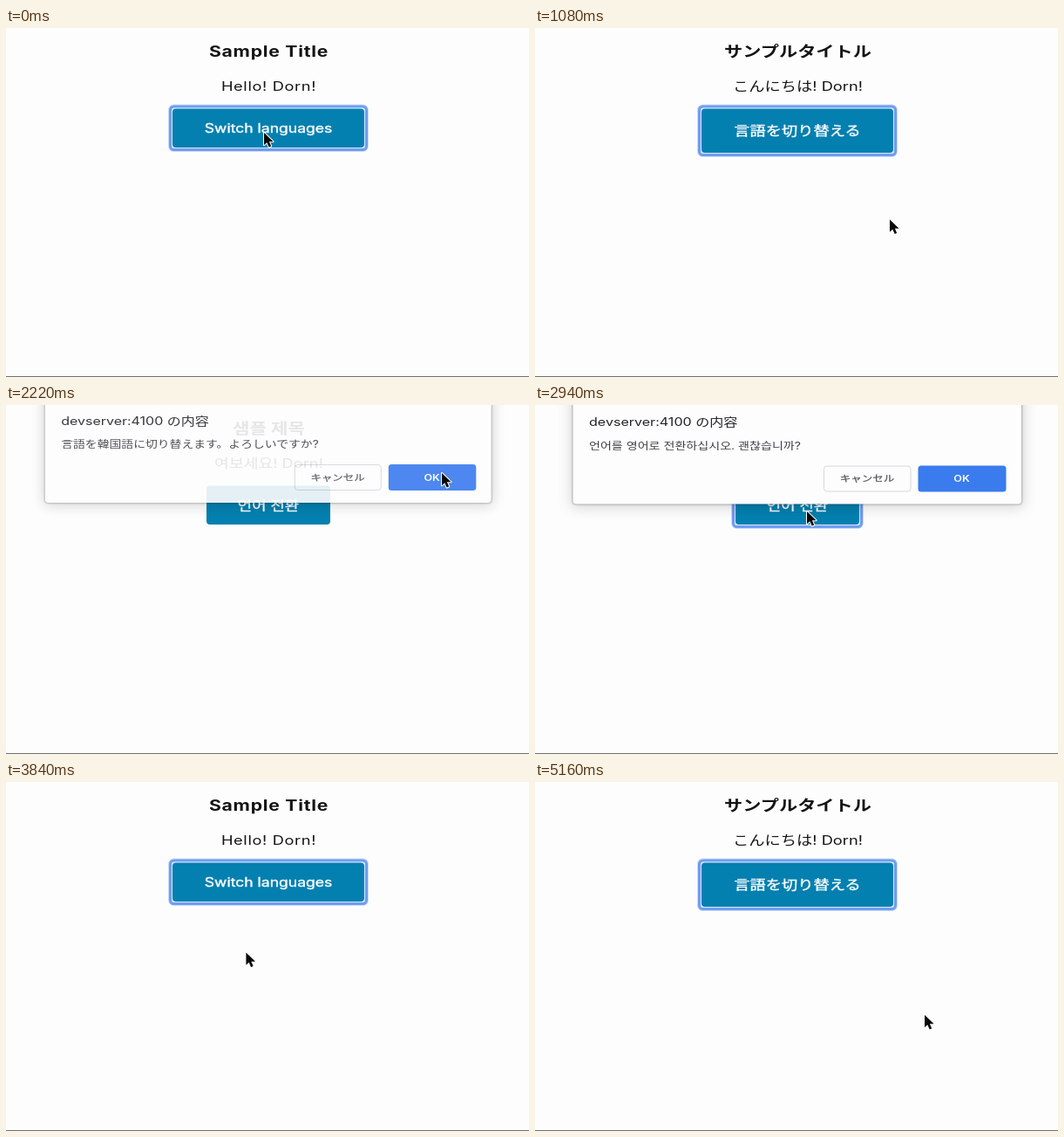
An HTML page that plays this animation: 600 by 400 pixels, repeating every 5.28 s.

```html
<!DOCTYPE html>
<html lang="en">
<head>
<meta charset="utf-8">
<title>Language switch</title>
<style>
  html, body { margin: 0; width: 100%; height: 100%; overflow: hidden; background: #fdfdfd; }
  svg { display: block; width: 600px; height: 400px; }
  text { font-family: Inter, "Noto Sans CJK JP", "Noto Sans CJK KR", "Noto Sans CJK", sans-serif; white-space: pre; }
  text:lang(ko) { font-family: Inter, "Noto Sans CJK KR", "Noto Sans CJK", sans-serif; }
  .halo { filter: blur(8px); }
  .edge { filter: blur(1.2px); }
</style>
</head>
<body>
<svg id="stage" viewBox="0 0 600 400"></svg>
<script>
const NS = 'http://www.w3.org/2000/svg';
const LOOP = 5280, STEP = 60, FADE = 180;
const PAPER = '#fdfdfd', INK = '#141414', TEAL = '#0480b0', BLUE = '#3a7bee';
const CENTER = 301, BUTTON_TOP = 92.5;
const WIDEN = 'scale(1.14 .91)';

function add(parent, tag, attrs = {}) {
  const el = document.createElementNS(NS, tag);
  for (const key in attrs) el.setAttribute(key, attrs[key]);
  parent.appendChild(el);
  return el;
}

function box(parent, x, y, width, height, attrs) {
  return add(parent, 'rect', { x, y, width, height, ...attrs });
}

function label(parent, str, x, y, size, attrs = {}) {
  const el = add(parent, 'text', {
    transform: `translate(${x} ${y}) ${WIDEN}`,
    'font-size': size, 'text-anchor': 'middle', fill: INK, ...attrs
  });
  el.textContent = str;
  return el;
}

const COPY = {
  en: {
    title: 'Sample Title', hello: 'Hello! Dorn!', action: 'Switch languages',
    ask: 'Switch language to Japanese. Is it OK?',
    track: '.035em', actionSize: 15.4, askSize: 13, width: 220, height: 44.5
  },
  ja: {
    title: 'サンプルタイトル', hello: 'こんにちは! Dorn!', action: '言語を切り替える',
    ask: '言語を韓国語に切り替えます。よろしいですか?',
    track: 0, actionSize: 16, askSize: 12.2, width: 220, height: 50.5
  },
  ko: {
    title: '샘플 제목', hello: '여보세요! Dorn!', action: '언어 전환',
    ask: '언어를 영어로 전환하십시오. 괜찮습니까?',
    track: 0, actionSize: 15.6, askSize: 12.35, width: 142, height: 44.5
  }
};

const stage = document.getElementById('stage');
box(stage, 0, 0, 600, 400, { fill: PAPER });
box(stage, 0, 399, 600, 1, { fill: '#707070' });

function makePage(lang) {
  const { title, hello, action, track, actionSize, width, height } = COPY[lang];
  const page = add(stage, 'g', { lang });
  label(page, title, CENTER + .5, 33, 18.6, { 'font-weight': 700, 'letter-spacing': track });
  label(page, hello, CENTER + .5, 72, 16, { 'letter-spacing': track });

  const ring = add(page, 'g', { fill: 'none', stroke: '#6f9df0' });
  const around = (grow, parent, attrs) => box(
    parent, CENTER - width / 2 - grow, BUTTON_TOP - grow, width + 2 * grow, height + 2 * grow,
    { rx: 4, ...attrs }
  );
  around(2.5, ring, { 'stroke-width': 5, 'stroke-opacity': .35 });
  around(2.5, ring, { 'stroke-width': 3 });
  around(1, ring, { fill: '#dbe8fb', stroke: 'none' });
  around(0, page, { fill: TEAL });
  label(page, action, CENTER, BUTTON_TOP + height / 2 + 5.3, actionSize, {
    fill: '#fcfcfc', stroke: '#fcfcfc', 'stroke-width': .4
  });
  return { page, ring };
}

const pages = {};
for (const lang in COPY) pages[lang] = makePage(lang);

const dialog = add(stage, 'g');
box(dialog, 42, -20, 518, 137, { rx: 6, fill: '#000', 'fill-opacity': .17, class: 'halo' });
box(dialog, 43, -20, 515.5, 134, { rx: 4, fill: '#000', 'fill-opacity': .35, class: 'edge' });
box(dialog, 43.5, -20, 514.5, 133.5, { rx: 4, fill: PAPER });
label(dialog, 'devserver:4100 の内容', 62, 24, 14.1, { 'text-anchor': 'start', fill: '#222226', lang: 'ja' });
const asks = {};
for (const lang in COPY) {
  const { ask, askSize } = COPY[lang];
  asks[lang] = label(dialog, ask, 62, 50.8, askSize, { 'text-anchor': 'start', fill: '#3e3e44', lang });
}
box(dialog, 331.5, 70, 99.5, 29, { rx: 3.5, fill: PAPER, stroke: '#d8d8de' });
label(dialog, 'キャンセル', 381, 88, 11, { fill: '#55555a', stroke: '#55555a', 'stroke-width': .25, lang: 'ja' });
box(dialog, 439.5, 69.5, 101, 30, { rx: 3.5, fill: BLUE });
label(dialog, 'OK', 489.5, 88, 11, { fill: '#fff', 'font-weight': 600 });

const cursor = add(stage, 'path', {
  d: 'M0 0V14.2L3.3 11.2L5.7 16.6L8.2 15.5L5.9 10.3H10.6Z',
  fill: '#080808', stroke: '#fff', 'stroke-width': 2, 'paint-order': 'stroke', 'stroke-linejoin': 'round'
});

// Each prompt: press the button, swing through `dip` to OK, swing through `sweep` away again.
const PROMPTS = [
  { open: 120, close: 660, back: 1560, from: 'en', to: 'ja', press: [296, 120], dip: [370, 150], sweep: [385, 230] },
  { open: 1740, close: 2220, back: 2700, from: 'ja', to: 'ko', press: [300, 122], dip: [380, 190], sweep: [405, 230] },
  { open: 2940, close: 3480, back: 3930, from: 'ko', to: 'en', press: [312, 122], dip: [400, 212], sweep: [295, 270] },
  { open: 4080, close: 4800, back: 5040, from: 'en', to: 'ja', press: [296, 122], dip: [361, 236], sweep: [480, 175] }
];
const OK_SPOT = [500, 78], REST = [447, 267];

// Eased arc from a to b that passes through mid halfway.
function arc(a, mid, b, k) {
  k = Math.min(1, Math.max(0, k));
  k = k * k * (3 - 2 * k);
  return a.map((p, i) => {
    const bend = 2 * mid[i] - (p + b[i]) / 2;
    return (1 - k) ** 2 * p + 2 * k * (1 - k) * bend + k * k * b[i];
  });
}

function cursorAt(t) {
  const next = PROMPTS.findIndex(p => t < p.back);
  const i = next < 0 ? PROMPTS.length - 1 : next;
  const { open, close, back, press, dip, sweep } = PROMPTS[i];
  const leave = close + STEP, arrive = close - STEP;
  if (t < leave) return arc(press, dip, OK_SPOT, (t - open - STEP) / (arrive - open - STEP));
  const end = i + 1 < PROMPTS.length ? PROMPTS[i + 1].press : REST;
  return arc(OK_SPOT, sweep, end, (t - leave) / (back - leave));
}

const show = (el, on) => el.setAttribute('display', on ? 'inline' : 'none');

function draw(t) {
  const prompt = PROMPTS.find(p => t >= p.open && t < p.close + FADE);
  const done = PROMPTS.filter(p => t >= p.close).pop();
  const lang = done ? done.to : PROMPTS[0].from;
  const fading = prompt && prompt === done;

  for (const key in pages) {
    show(pages[key].page, key === lang);
    show(pages[key].ring, !fading);
  }
  const [x, y] = cursorAt(t);
  cursor.setAttribute('transform', `translate(${x} ${y})`);

  show(dialog, prompt);
  if (!prompt) return;
  for (const key in asks) show(asks[key], key === prompt.from);
  dialog.setAttribute('opacity', fading ? .9 * (1 - (t - prompt.close) / FADE) : 1);
  dialog.setAttribute('transform', fading ? 'translate(1.5 -1.5) scale(.995 1)' : '');
}

const start = performance.now();
function tick() {
  const t = (performance.now() - start) % LOOP;
  draw(Math.floor(t / STEP) * STEP);
  requestAnimationFrame(tick);
}
tick();
</script>
</body>
</html>
```
